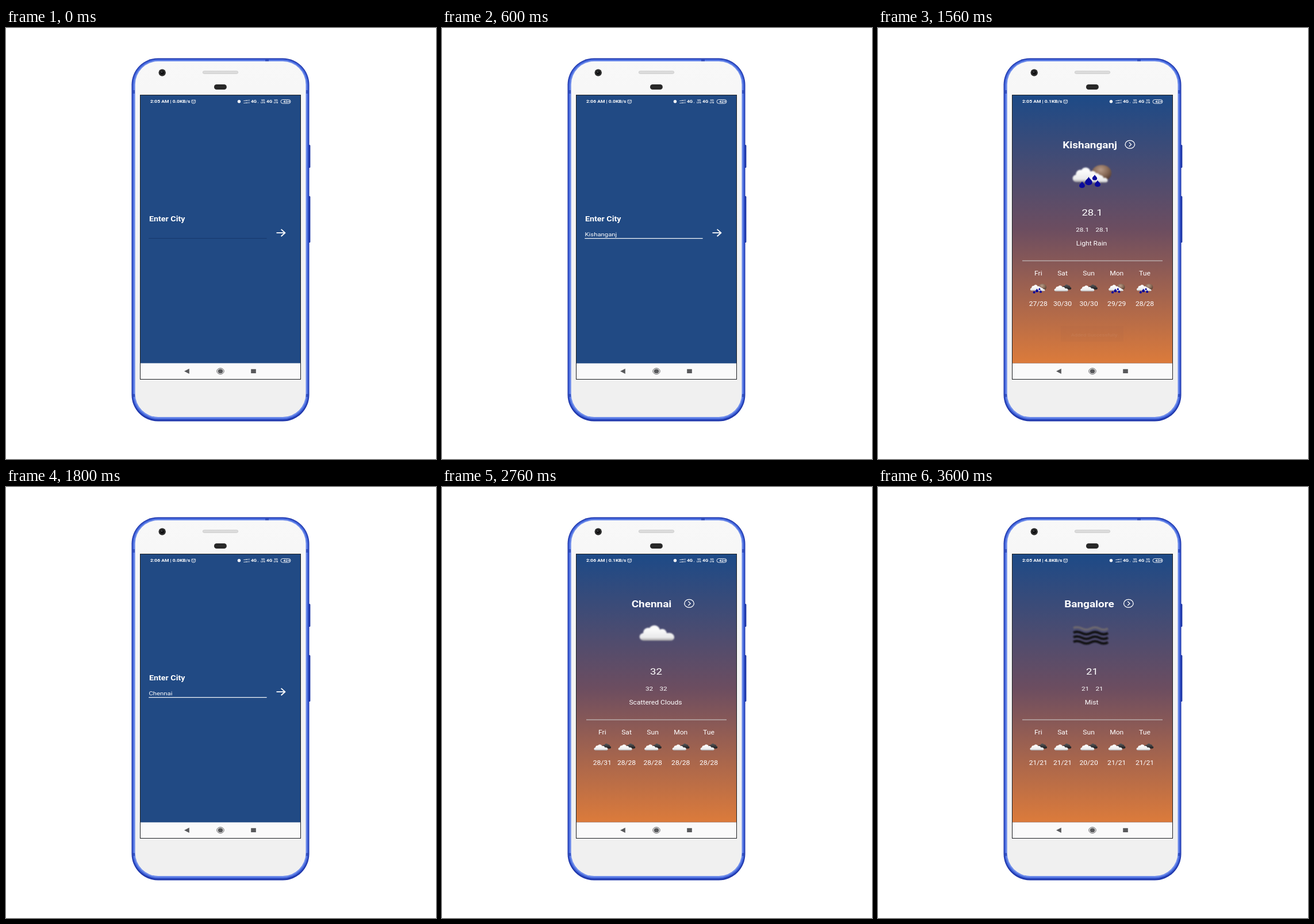
An HTML page that plays this animation: 748 by 749 pixels, repeating every 4.2 s.

```html
<!DOCTYPE html>
<html lang="en">
<head>
<meta charset="utf-8">
<title>Weather app</title>
<style>
  html, body { margin: 0; width: 100%; height: 100%; overflow: hidden; background: #fff; }
  svg { display: block; width: 748px; height: 749px; }
  text { font-family: Roboto, "Open Sans", sans-serif; fill: #fff; }
</style>
</head>
<body>
<svg viewBox="0 0 748 749">
  <defs>
    <linearGradient id="body" x2="0" y2="1">
      <stop offset="0" stop-color="#f8f8f8"/><stop offset=".15" stop-color="#f6f6f6"/><stop offset=".88" stop-color="#f0f0f0"/>
    </linearGradient>
    <linearGradient id="sky" x2="0" y2="1">
      <stop offset="0" stop-color="#1d4a87"/><stop offset=".5" stop-color="#6c4d60"/><stop offset="1" stop-color="#dc7b3b"/>
    </linearGradient>
    <linearGradient id="white" x2="0" y2="1">
      <stop offset=".3" stop-color="#fafafa"/><stop offset=".8" stop-color="#e9e9ea"/><stop offset="1" stop-color="#a09ea0"/>
    </linearGradient>
    <linearGradient id="dark" x2="0" y2="1">
      <stop offset="0" stop-color="#5a5a5c"/><stop offset="1" stop-color="#1c1c1e"/>
    </linearGradient>
    <radialGradient id="sun" cx=".45" cy=".3" r=".75">
      <stop offset="0" stop-color="#b79a86"/><stop offset=".5" stop-color="#886a57"/><stop offset="1" stop-color="#493127"/>
    </radialGradient>
    <filter id="soft" x="-20%" y="-20%" width="140%" height="140%"><feGaussianBlur stdDeviation=".8"/></filter>

    <path id="cloud" d="M8 27C-1 27-2 15 7 14C7 6 14 4 18 5C22-2 34-1 36 8C41 5 47 8 48 14C55 12 61 16 61 21C61 25 58 27 54 27Z"/>
    <path id="drop" d="M0-6C1-3 5.5-1 5.5 2.5A5.5 4.2 0 0 1-5.5 2.5C-5.5-1-1-3 0-6Z" fill="#0a0a9c"/>

    <g id="clouds"><use href="#cloud" x="-29" y="-18" fill="url(#white)" filter="url(#soft)"/></g>
    <g id="broken">
      <use href="#cloud" transform="translate(37 -17) scale(-.76 .78)" fill="url(#dark)"/>
      <use href="#cloud" transform="translate(-35 -13) scale(.95 .92)" fill="url(#white)"/>
    </g>
    <g id="rain">
      <ellipse cx="17" cy="-6" rx="17" ry="14" fill="url(#sun)" filter="url(#soft)"/>
      <g filter="url(#soft)">
        <use href="#cloud" transform="translate(-34 -16) scale(.88 .95)" fill="url(#white)"/>
        <use href="#cloud" transform="translate(-6 -6) scale(.55 .62)" fill="url(#white)"/>
      </g>
      <use href="#drop" transform="translate(-17 14) scale(.9)"/>
      <use href="#drop" transform="translate(-5.5 7.5) scale(1.15)"/>
      <use href="#drop" transform="translate(5 1.5) scale(.75)"/>
      <use href="#drop" transform="translate(10 12) scale(.9)"/>
    </g>
    <g id="mist" fill="none" stroke-width="4" filter="url(#soft)"></g>
  </defs>

  <!-- side buttons -->
  <g fill="#1f39a8">
    <rect x="524" y="203" width="5.4" height="40" rx="1.5"/>
    <rect x="524" y="292" width="5.4" height="81" rx="1.5"/>
  </g>
  <!-- shell -->
  <rect x="218.5" y="52.5" width="309" height="631" rx="46" fill="#2139ad"/>
  <rect x="220" y="54" width="306" height="626.5" rx="44.5" fill="#3f62d8"/>
  <rect x="222.2" y="56" width="301.6" height="622.5" rx="42.5" fill="#6d8bea"/>
  <rect x="224.7" y="58" width="296.8" height="618" rx="40" fill="url(#body)"/>
  <g fill="#2a45b4" opacity=".75">
    <rect x="219" y="108" width="5" height="6"/><rect x="522" y="108" width="5" height="6"/>
    <rect x="219" y="636" width="5" height="5"/><rect x="522" y="636" width="5" height="5"/>
    <rect x="451" y="53" width="6" height="5"/>
  </g>
  <circle cx="271.7" cy="77.6" r="6.2" fill="#2b2b2b"/>
  <circle cx="271.7" cy="77.6" r="3.2" fill="#0d0d0f"/>
  <circle cx="271" cy="76.6" r="1" fill="#6b6f72"/>
  <rect x="342.3" y="74.8" width="61.4" height="4.6" rx="2.3" fill="#dcdcdc" stroke="#c4c4c4" stroke-width=".7"/>
  <rect x="362" y="98" width="21.8" height="9" rx="4.3" fill="#282828"/>

  <!-- screen -->
  <rect x="233.5" y="116.5" width="279" height="494" fill="#fafafa"/>
  <g id="scenes"></g>
  <rect x="233.5" y="116.5" width="279" height="494" fill="none" stroke="#1d2023"/>
  <g fill="#58595b">
    <path d="M310 596.5L318.8 592V601Z"/>
    <rect x="426.2" y="592.8" width="8.6" height="7.2"/>
    <ellipse cx="373" cy="596.4" rx="6.2" ry="5.2" fill="none" stroke="#58595b" stroke-width="1"/>
    <ellipse cx="373" cy="596.4" rx="4.4" ry="3.6"/>
  </g>
</svg>

<script>
const STEP = 600;
const WIDE = 1.2; // the handset shows its screen slightly widened
const DAYS = ["Fri", "Sat", "Sun", "Mon", "Tue"];
const COLS = [278.8, 321, 366.6, 415.2, 464];

const text = (x, y, size, str, weight = 400, anchor = "middle", extra = "") =>
  `<text transform="translate(${x} ${y}) scale(${WIDE} 1)" font-size="${size}" font-weight="${weight}" text-anchor="${anchor}" ${extra}>${str}</text>`;
const icon = (name, x, y, scale = 1) =>
  `<use href="#${name}" transform="translate(${x} ${y}) scale(${scale})"/>`;

function signal(y) {
  let bars = "";
  for (let i = 0; i < 5; i++) {
    const h = 1 + i * 0.4;
    bars += `<rect x="${413.5 + i * 2.2}" y="${y - h}" width="1.4" height="${h}" opacity="${i < 3 ? 1 : 0.5}"/>`;
  }
  return bars;
}

function status(clock, speed, charge) {
  const volte = x => text(x, 127.1, 3.9, "VO", 700) + text(x, 131, 3.9, "LTE", 700);
  return text(251, 130.4, 7.1, `${clock} AM | ${speed}KB/s`, 700, "start") +
    `<g fill="none" stroke="#fff" stroke-width=".9">
      <ellipse cx="326.2" cy="128.2" rx="3.4" ry="3"/>
      <path d="M322.4 126.2L324 124.5M330 126.2L328.4 124.5M324.8 127.6L326.2 129L327.8 127.6"/>
      <rect x="478" y="124.5" width="17" height="6.6" rx="3.3"/>
    </g>
    <g fill="#fff"><circle cx="405.5" cy="127.8" r="2.7"/>${signal(127)}${signal(131)}
      <rect x="438" y="129" width="1" height="1.4" opacity=".6"/>
      <path d="M491 126H492.5A1.8 1.8 0 0 1 492.5 129.6H491Z" opacity=".6"/></g>` +
    text(431, 130.4, 6.8, "4G", 700) + volte(447) +
    text(458.2, 130.4, 6.8, "4G", 700) + volte(469.5) +
    text(486.2, 130.1, 5.8, charge, 700);
}

const backdrop = fill => `<rect x="234" y="117" width="278" height="465.5" fill="${fill}"/>`;

function form(city, caret) {
  const line = city ? 'stroke="#f2f5f9" stroke-width="1.4"' : 'stroke="#15386c" stroke-width="1"';
  return backdrop("#214a84") +
    text(249, 336.4, 11.9, "Enter City", 700, "start") +
    text(248.5, 361.8, 9.45, city, 400, "start") +
    `<path d="M248.3 365.6H453.6" ${line}/>
     <path d="M470.5 355.9H485M478.6 349.8L485.4 355.9L478.6 362" fill="none" stroke="#fff" stroke-width="1.8"/>` +
    (caret ? `<path d="M${caret} 351.5V364" stroke="#fff" stroke-width="1.3"/>` : "");
}

function weather({ city, mid, arrow, now, sky, art, days, temps, toast }) {
  const range = `<tspan>${now}</tspan><tspan dx="9.5">${now}</tspan>`;
  return backdrop("url(#sky)") +
    text(mid, 208.8, 15.8, city, 700) +
    `<g fill="none" stroke="#fff" stroke-width="1.3"><ellipse cx="${arrow}" cy="202.4" rx="8.3" ry="7"/>
      <path d="M${arrow - 1.6} 198.8L${arrow + 2.2} 202.4L${arrow - 1.6} 206"/></g>` +
    icon(art, 372, 258) +
    text(372.5, 325.6, 15.45, now) +
    text(372.8, 354.3, 9.8, range) +
    text(371.5, 378.3, 10.1, sky) +
    `<path d="M251 404.5H495" stroke="#b9abaa" stroke-width="1.5"/>` +
    DAYS.map((day, i) =>
      text(COLS[i], 429.8, 10.1, day) +
      icon(days[i], COLS[i], 452.8, 0.42) +
      text(COLS[i], 483.2, 10.1, temps[i])).join("") +
    (toast ? `<rect x="318" y="518" width="109" height="27" fill="#8a5a48" opacity=".07"/>` +
      text(376, 536, 7.7, toast, 400, "middle", 'opacity=".07"') : "");
}

const cloudy = Array(5).fill("broken");
const scenes = [
  form("") + status("2:05", "0.0", 43),
  form("Kishanganj") + status("2:06", "0.0", 42),
  weather({
    city: "Kishanganj", mid: 368.6, arrow: 438.3, now: "28.1", sky: "Light Rain", art: "rain",
    days: ["rain", "broken", "broken", "rain", "rain"],
    temps: ["27/28", "30/30", "30/30", "29/29", "28/28"], toast: "Added Successfully"
  }) + status("2:05", "0.1", 42),
  form("Chennai") + status("2:06", "0.0", 42),
  weather({
    city: "Chennai", mid: 364.5, arrow: 430, now: "32", sky: "Scattered Clouds", art: "clouds",
    days: cloudy, temps: ["28/31", "28/28", "28/28", "28/28", "28/28"]
  }) + status("2:06", "0.1", 42),
  form("Bangalore", 299.8) + status("2:06", "0.2", 42),
  weather({
    city: "Bangalore", mid: 367.5, arrow: 435.8, now: "21", sky: "Mist", art: "mist",
    days: cloudy, temps: ["21/21", "21/21", "20/20", "21/21", "21/21"]
  }) + status("2:05", "4.8", 43)
];

document.getElementById("mist").innerHTML = [-12, -4, 4, 12].map((y, i) =>
  `<path d="M-32 ${y - 1}q7.5-3 15 1t15 0t15 0t15 0" stroke="${i ? "#0b0b10" : "#77706f"}" opacity="${i ? 1 : 0.75}"/>`).join("");

const holder = document.getElementById("scenes");
holder.innerHTML = scenes.map(s => `<g>${s}</g>`).join("");

// The first scene stays put; each later one covers it during its own step.
const count = scenes.length;
[...holder.children].slice(1).forEach((g, k) => {
  const i = k + 1;
  const frames = [[0, 0], [i / count, 1], [(i + 1) / count, 0], [1, 0]]
    .map(([offset, opacity]) => ({ offset, opacity, easing: "steps(1, end)" }));
  g.animate(frames, { duration: STEP * count, iterations: Infinity, fill: "both" });
});
</script>
</body>
</html>
```
